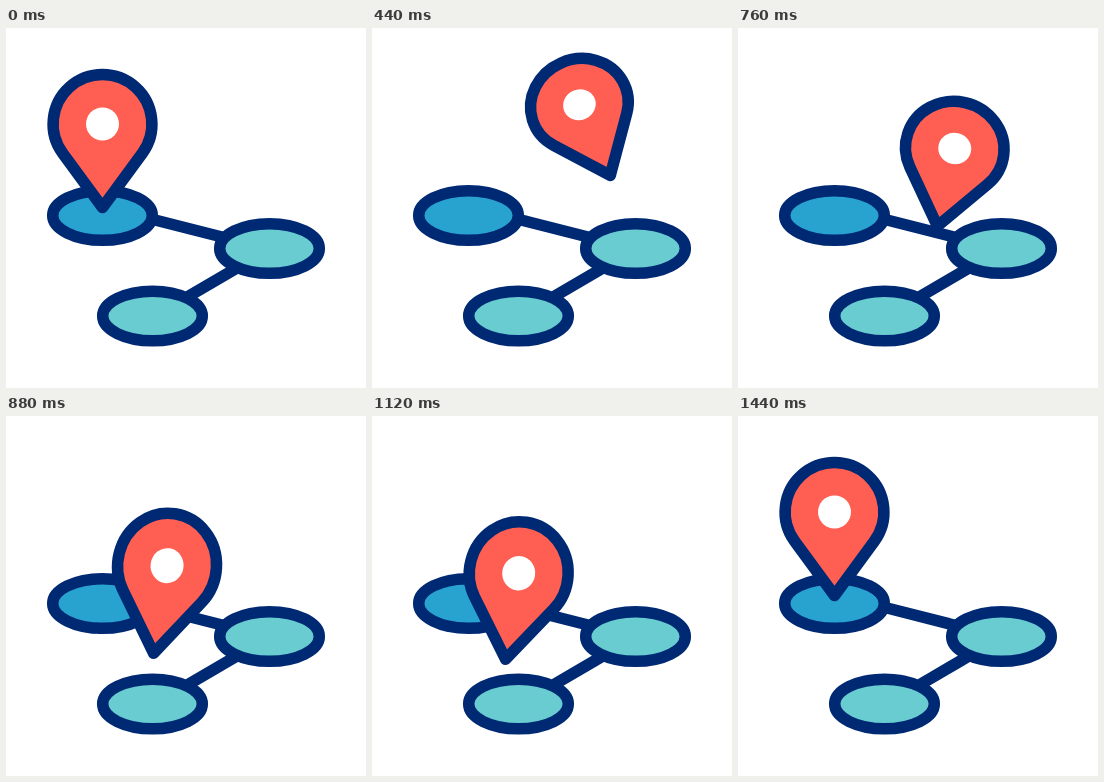
An HTML page for the animation above (2000 ms loop, 360 px wide and 360 px high).

```html
<!DOCTYPE html>
<html lang="en">
<head>
<meta charset="utf-8">
<title>Hopping map pin</title>
<style>
  html, body { margin: 0; width: 100%; height: 100%; overflow: hidden; background: #fff; }
  svg { display: block; width: 100vw; height: 100vh; }
  .ink { stroke: #002973; stroke-width: 11.5; stroke-linejoin: round; stroke-linecap: round; }
</style>
</head>
<body>
<svg viewBox="0 0 360 360">
  <g class="ink">
    <path d="M149 192L216 209M230 240.500L183 268" fill="none"/>
    <ellipse cx="96.500" cy="187.500" rx="49.800" ry="24.800" fill="#28a2ce"/>
    <ellipse cx="263.500" cy="220.500" rx="49.800" ry="24.800" fill="#68ccd1"/>
    <ellipse cx="146.500" cy="288" rx="49.800" ry="24.800" fill="#68ccd1"/>
  </g>
  <path id="body" class="ink" fill="#ff5f52"/>
  <ellipse id="hole" rx="16.500" fill="#fff"/>
</svg>
<script>
const LOOP = 2000, STEP = 40, END = 1440;
const LEAVE = 270, BEAT = 390, AIR = 280;
const R = 49.4, LEG = 83.5, HOLE = 16.5;

// Where the foot lands, how deep the pin squashes there,
// then how high and how tilted it hops on to the next stop
const HOME = { x: 96.5, y: 179.5 };
const STOPS = [
  { ...HOME, dip: 0.36, rise: 54, lean: -25 },
  { x: 249, y: 211.5, dip: 0.36, rise: 41, lean: 14 },
  { x: 147.6, y: 279.5, dip: 0.36, rise: 15, lean: 12.3 },
  { ...HOME, dip: 0.08 }
];

const mix = (a, b, u) => a + (b - a) * u;
const smooth = u => u * u * (3 - 2 * u);
const wave = (u, n = 1) => Math.sin(n * Math.PI * u);

function rest(stop, g) {
  return { x: stop.x, y: stop.y, s: 1 - stop.dip * wave(g ** 2.8), tilt: 0 };
}

// The foot swings ahead of the head, so it arrives early
function hop(from, to, u) {
  return {
    x: mix(from.x, to.x, smooth(Math.min(1, 1.38 * u))),
    y: mix(from.y, to.y, u) - from.rise * 4 * u * (1 - u),
    s: 1 + 0.09 * wave(u, 3) - 0.03 * wave(u),
    tilt: from.lean * wave(u)
  };
}

function pose(t) {
  const i = Math.max(0, Math.floor((t - LEAVE) / BEAT));
  const u = (t - LEAVE - i * BEAT) / AIR;
  if (u < 0) return rest(STOPS[0], t / LEAVE);
  if (u < 1) return hop(STOPS[i], STOPS[i + 1], u);
  return rest(STOPS[i + 1], (u - 1) * AIR / (BEAT - AIR));
}

const body = document.getElementById("body");
const hole = document.getElementById("hole");

function draw(t) {
  const { x, y, s, tilt } = pose(t);
  const a = tilt * Math.PI / 180, leg = LEG * s;
  const place = `translate(${x + leg * Math.sin(a)} ${y - leg * Math.cos(a)}) rotate(${tilt})`;
  const sin = R / LEG, cos = Math.sqrt(1 - sin * sin);
  const px = R * cos, py = R * sin * s;
  body.setAttribute("d", `M0 ${leg}L${-px} ${py}A${R} ${R * s} 0 1 1 ${px} ${py}Z`);
  body.setAttribute("transform", place);
  hole.setAttribute("ry", HOLE * s);
  hole.setAttribute("transform", place);
}

const start = performance.now();
function tick() {
  const t = (performance.now() - start) % LOOP;
  draw(Math.min(END - 1e-6, Math.floor(t / STEP) * STEP));
  requestAnimationFrame(tick);
}
tick();
</script>
</body>
</html>
```
